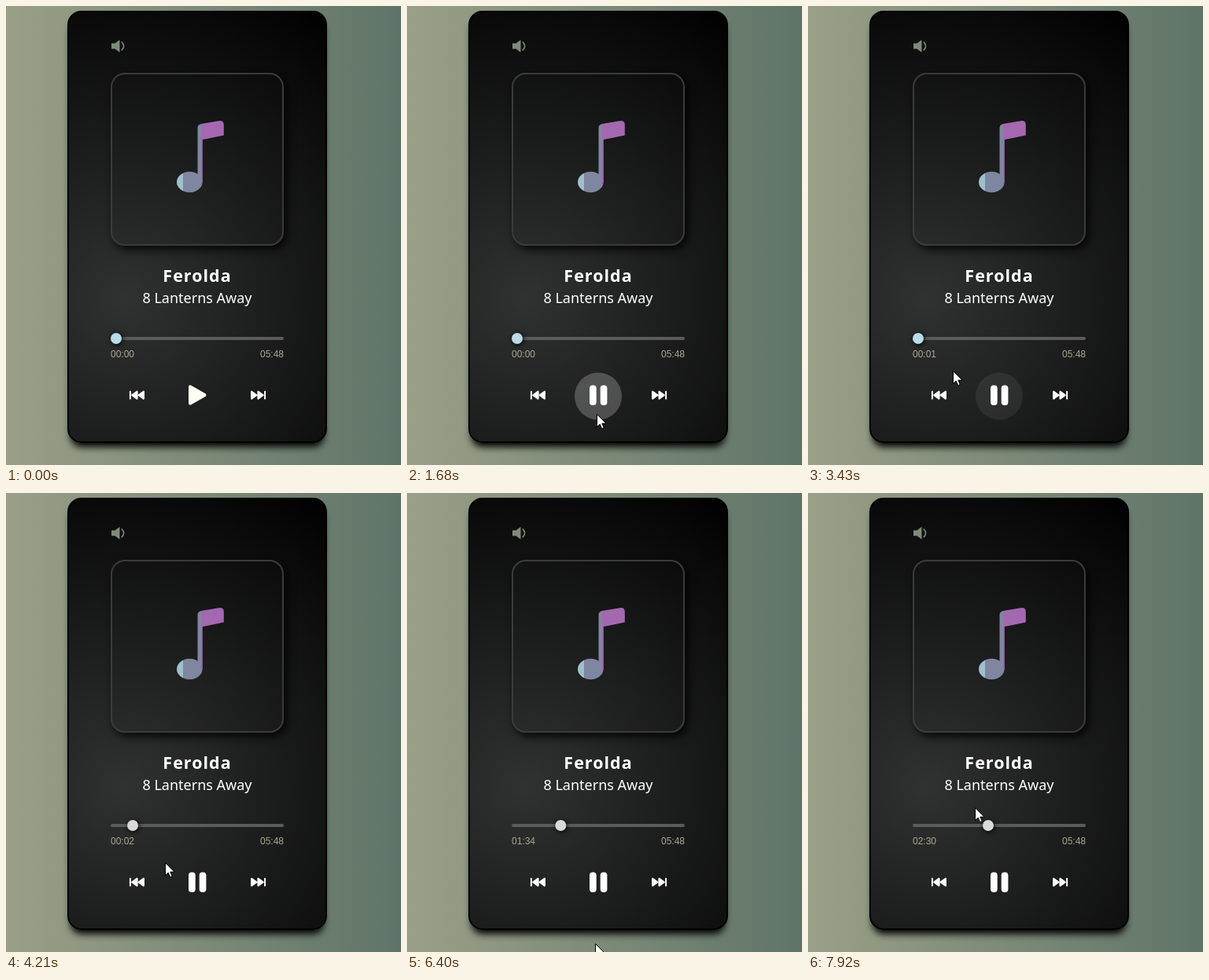
Write an HTML page that moves like this. It is 502x584 px and loops after 7990 ms.

```html
<!DOCTYPE html>
<html lang="en">
<head>
<meta charset="utf-8">
<title>Music player</title>
<style>
  html, body { margin: 0; width: 100%; height: 100%; overflow: hidden; }
  body { background: linear-gradient(90deg, #9aa088, #5f7468); }
  .stage { position: relative; width: 502px; height: 584px; overflow: hidden; }
  .card, .art { position: absolute; box-sizing: border-box; border-radius: 18px; }
  .card {
    left: 78px; top: 6px; width: 330px; height: 550px; border: 2px solid #000;
    background: radial-gradient(circle 450px at 70px 364px, #303131, #000);
    box-shadow: 0 9px 10px -4px #000;
  }
  .art {
    left: 133px; top: 85px; width: 220px; height: 220px; border: 2px solid #3b3b3b;
    box-shadow: 4px 5px 12px rgba(0, 0, 0, .85);
  }
  svg { position: absolute; left: 0; top: 0; display: block; }
  .name { font: 700 21.5px "Noto Sans", "Open Sans", sans-serif; letter-spacing: 1px; }
  .song { font: 500 18px "Noto Sans", "Open Sans", sans-serif; }
  .name, .song { fill: #fff; text-anchor: middle; }
  .time { font: 12px "Liberation Sans", Arial, sans-serif; fill: #aaa792; }
  #knob { filter: drop-shadow(1px 1px 3px #000); }
</style>
</head>
<body>
<div class="stage">
  <div class="card"></div>
  <div class="art"></div>
  <svg width="502" height="584" viewBox="0 0 502 584">
    <defs>
      <linearGradient id="tint" gradientUnits="userSpaceOnUse" x1="217" x2="277" y1="0" y2="0">
        <stop offset=".13" stop-color="#9dc0cb"/>
        <stop offset=".13" stop-color="#7f86a0"/>
        <stop offset=".51" stop-color="#7f86a0"/>
        <stop offset=".51" stop-color="#a468b0"/>
      </linearGradient>
      <g id="skip" fill="#fff" stroke="#fff" stroke-linejoin="round">
        <path d="M157.9 489.8V500.4" stroke-width="2"/>
        <path d="M160.3 495.1L166.5 490.6V499.6ZM168.7 495.1L174.9 490.6V499.6Z" stroke-width="2.2"/>
      </g>
    </defs>

    <g fill="#7f8b79">
      <path d="M134 47.5H138.5L144.5 43V59L138.5 54.5H134Z"/>
      <path d="M146.8 45.5Q152.6 51 146.8 56.5" fill="none" stroke="#7f8b79" stroke-width="1.6"/>
    </g>

    <g fill="url(#tint)">
      <ellipse cx="233.3" cy="224" rx="16.3" ry="13.2"/>
      <path d="M243.5 224V155Q243.5 150.8 248 149.9L270 146.2Q276.8 145.3 276.8 151V164.5L249.8 170V224Z"/>
    </g>

    <text class="name" x="243" y="351">Ferolda</text>
    <text class="song" x="243" y="378">8 Lanterns Away</text>

    <rect x="133" y="421" width="220" height="4" rx="2" fill="#5a5c5c"/>
    <circle id="knob" cy="423" r="7"/>
    <text class="time" id="clock" x="133" y="447"></text>
    <text class="time" x="353" y="447" text-anchor="end">05:48</text>

    <g fill="#fff">
      <circle class="glow" cx="243" cy="496.5" r="30"/>
      <circle class="glow" cx="166" cy="496.5" r="25"/>
    </g>
    <use href="#skip"/>
    <use href="#skip" transform="translate(487 0) scale(-1 1)"/>
    <path id="play" d="M234.2 484.6V505.4L252.2 495Z" fill="#fffef4" stroke="#fffef4" stroke-width="4.4" stroke-linejoin="round"/>
    <g id="pause" fill="#fff">
      <rect x="232" y="482.5" width="8.7" height="25.5" rx="4"/>
      <rect x="245.7" y="482.5" width="8.7" height="25.5" rx="4"/>
    </g>

    <path id="cursor" d="M.5 .5V16.6L4.2 13.1 6.7 18.7 9.2 17.6 6.8 12.1H12Z" fill="#fff" stroke="#000"/>
  </svg>
</div>
<script>
const LOOP = 7990, PLAY = 1400, TICK = 1000, PHASE = 900, FADE = 140;
const KNOB_MIN = 140, KNOB_SPAN = 206, LENGTH = 348;
const $ = id => document.getElementById(id);

// Pointer gestures: it rests between them, and a drag carries the knob along.
const start = { x: 330, y: 584 };
const moves = [
  { from: 460, to: 1190, x: 238, y: 497 },
  { from: 1470, to: 1890, x: 242, y: 531 },
  { from: 2100, to: 2830, x: 258, y: 529 },
  { from: 3230, to: 3650, x: KNOB_MIN, y: 424 },
  { from: 3650, to: 3930, x: 161, y: 424, drag: true },
  { from: 3930, to: 4350, x: 212, y: 481 },
  { from: 4550, to: 4690, x: 161, y: 424 },
  { from: 4690, to: 4920, x: 195.3, y: 424, drag: true },
  { from: 4920, to: 5240, x: 175, y: 540 },
  { from: 6260, to: 6540, x: 273, y: 590 },
  { from: 6900, to: 7100, x: 397, y: 590 },
  { from: 7100, to: 7290, x: 267, y: 444 },
  { from: 7290, to: 7430, x: 195.3, y: 424 },
  { from: 7430, to: 7780, x: 229, y: 424, drag: true },
  { from: 7780, to: 7920, x: 212, y: 400 }
];
const drags = moves.filter(m => m.drag);

const ease = u => 1 - (1 - u) ** 1.5;
const mix = (a, b, k) => a + (b - a) * k;
const pad = n => String(n).padStart(2, "0");

function pointerAt(t) {
  let p = start;
  for (const m of moves) {
    if (t < m.from) break;
    const k = ease(Math.min(1, (t - m.from) / (m.to - m.from)));
    p = { x: mix(p.x, m.x, k), y: mix(p.y, m.y, k) };
  }
  return p;
}

function knobAt(t) {
  const drag = drags.filter(d => d.from <= t).pop();
  return drag ? pointerAt(Math.min(t, drag.to)).x : KNOB_MIN;
}

// The clock is read once per tick and counts on from the last release.
function secondsAt(t) {
  const read = Math.floor((t - PHASE) / TICK) * TICK + PHASE;
  const drag = drags.filter(d => d.to <= read).pop();
  const base = drag ? (drag.x - KNOB_MIN) / KNOB_SPAN * LENGTH : 0;
  return Math.max(0, Math.floor(base + (read - (drag ? drag.to : PLAY)) / 1000));
}

// A button's glow is the share of the last FADE ms the pointer spent on it.
function glowAt(t, button) {
  const [cx, cy, r] = ["cx", "cy", "r"].map(a => +button.getAttribute(a));
  const samples = 10;
  let inside = 0;
  for (let i = 0; i < samples; i++) {
    const p = pointerAt(t - FADE * i / samples);
    if (Math.hypot(p.x - cx, p.y - cy) < r) inside++;
  }
  return .22 * inside / samples;
}

function draw() {
  const t = performance.now() % LOOP;
  const p = pointerAt(t), sec = secondsAt(t), playing = t >= PLAY;

  $("cursor").setAttribute("transform", `translate(${Math.round(p.x)} ${Math.round(p.y)})`);
  $("knob").setAttribute("cx", knobAt(t));
  $("knob").setAttribute("fill", t < drags[0].from ? "#b9dce8" : "#d9d9d9");
  $("clock").textContent = pad(Math.floor(sec / 60)) + ":" + pad(sec % 60);
  $("play").style.display = playing ? "none" : "";
  $("pause").style.display = playing ? "" : "none";
  for (const b of document.querySelectorAll(".glow")) b.setAttribute("opacity", glowAt(t, b));
  requestAnimationFrame(draw);
}
draw();
</script>
</body>
</html>
```
